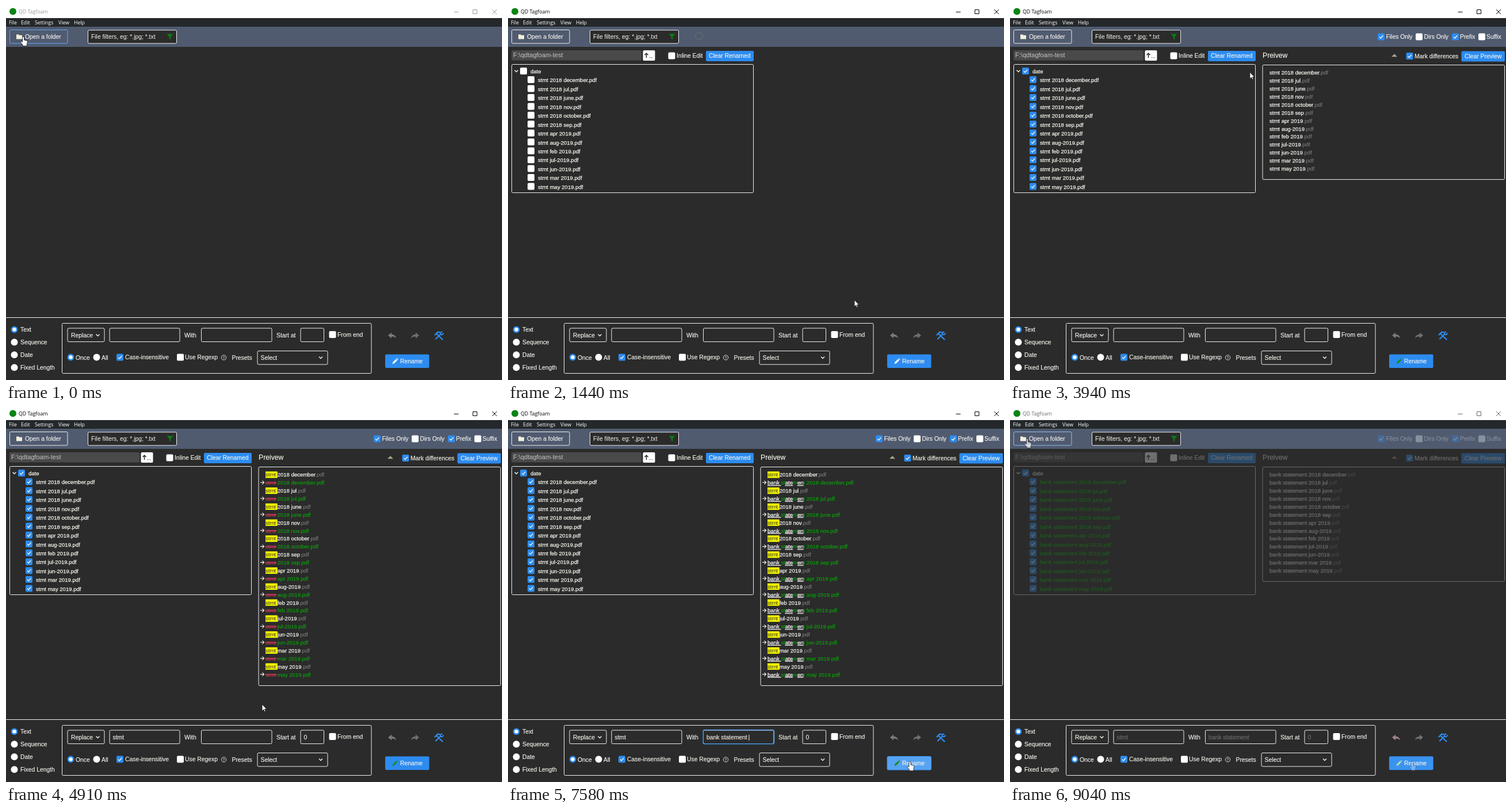
Write an HTML page that moves like this. It is 862x650 px and loops after 9240 ms.

```html
<!DOCTYPE html>
<html lang="en">
<head>
<meta charset="utf-8">
<title>QD Tagfoam</title>
<style>
html, body { margin: 0; width: 100%; height: 100%; overflow: hidden; background: #2b2b2b; }
svg { display: block; }
text { font: 10.35px "Liberation Sans", Arial, sans-serif; fill: #f6f5ee; white-space: pre; }
.ui { stroke: #f6f5ee; stroke-width: .15; }
.menu { font: 8.75px "Open Sans", "Noto Sans", sans-serif; fill: #fff; }
.title { font: 8.75px "Open Sans", "Noto Sans", sans-serif; }
.name { font-size: 9.54px; }
.strong { fill: #f6f5ee; stroke: #f6f5ee; stroke-width: .25; }
.path { font-size: 11.05px; fill: #c4c4c4; }
.head { font-size: 12.2px; }
.new { fill: #0b0; }
.done { fill: #0b0; stroke: #0b0; stroke-width: .2; }
.ext { fill: #858585; }
.cut { fill: #e0405a; text-decoration: line-through; }
.add { fill: #fff; stroke: #fff; stroke-width: .25; text-decoration: underline; }
.frame { fill: none; stroke: #eee; }
.blue { fill: #2d8cf0; }
.white { fill: #fff; }
.stroke { fill: none; stroke: #f4f4ee; stroke-width: 1.4; }
</style>
</head>
<body>
<svg width="862" height="650" viewBox="0 0 862 650">
  <g id="start"></g>
  <g id="live"></g>
</svg>
<script>
const LOOP = 9240;
const STEP = 110;
const TYPED = 'bank statement ';
const names = ['2018 december', '2018 jul', '2018 june', '2018 nov', '2018 october', '2018 sep',
  'apr 2019', 'aug-2019', 'feb 2019', 'jul-2019', 'jun-2019', 'mar 2019', 'may 2019'];

// Pointer moves: begin, end, from x, y, to x, y
const moves = [
  [440, 1320, 30, 53, 602, 511],
  [1770, 2610, 602, 511, 32, 116],
  [3170, 4050, 32, 116, 465, 115],
  [4580, 4910, 465, 115, 445, 515],
  [5020, 5250, 445, 515, 400, 572],
  [5480, 5910, 400, 572, 530, 535],
  [7360, 7580, 530, 535, 698.5, 614]
];
// Pointer shape from each time on
const shapes = [[0, 'hand'], [110, 'arrow'], [2610, 'hand'], [3270, 'arrow'], [4050, 'beam'],
  [4690, 'arrow'], [5250, 'beam'], [5590, 'arrow'], [7580, 'hand']];
const fades = [[0, 1], [8550, .8], [8640, .65], [8840, .5], [9040, .32]];
const previews = [[0, ''], [2730, 'plain'], [4470, 'cut'], [5690, 'first'], [7250, 'full'], [8010, 'done']];

const latest = (list, t) => list.filter(([from]) => from <= t).pop()[1];

function pointerAt(t) {
  const move = moves.filter(m => m[0] <= t).pop();
  if (!move) return [30, 53];
  const [begin, end, x0, y0, x1, y1] = move;
  const count = Math.round((end - begin) / STEP) + 1;
  const done = Math.floor((t - begin) / (end - begin) * (count - 1) + 1e-6) + 1;
  const k = Math.min(1, done / count);
  return [x0 + (x1 - x0) * k, y0 + (y1 - y0) * k];
}

function stateAt(t) {
  return {
    active: t >= 110,
    opening: t < 440,
    loaded: t >= 1440,
    spinner: t >= 1440 && t < 2950,
    checked: t < 2730 ? 0 : t < 2950 ? .5 : 1,
    preview: latest(previews, t),
    find: t >= 4470,
    focus: t >= 5350 && t < 7910,
    typed: TYPED.slice(0, Math.max(0, Math.floor((t - 5570) / STEP) + 1)),
    hover: t >= 7580,
    renamed: t >= 8010,
    pointer: pointerAt(t),
    shape: latest(shapes, t)
  };
}

const text = (x, y, s, cls = 'ui') => `<text x="${x}" y="${y}" class="${cls}">${s}</text>`;
const span = (cls, s) => `<tspan class="${cls}">${s}</tspan>`;
const rect = (x, y, w, h, cls, extra = '') =>
  `<rect x="${x}" y="${y}" width="${w}" height="${h}" rx="2" class="${cls}" ${extra}/>`;
const path = (d, cls, extra = '') => `<path d="${d}" class="${cls}" ${extra}/>`;
const flat = (x, y, w, h, fill) => `<rect x="${x}" y="${y}" width="${w}" height="${h}" fill="${fill}"/>`;
const chevron = (x, y) => path(`M${x - 3} ${y - 1.5}l3 3 3-3`, 'stroke');

function check(x, y, on = 0) {
  const fill = on === 1 ? '#2d8cf0' : on ? '#b5d4f6' : '#fff';
  const tick = on ? path(`M${x + 3} ${y + 6.2}l2.2 2.2 4-4.6`, 'stroke', `opacity="${on === 1 ? 1 : .35}"`) : '';
  return rect(x, y, 12, 12, '', `fill="${fill}"`) + tick;
}
const checkLabel = (x, y, gap, label, on) => check(x, y, on) + text(x + gap, y + 9.5, label);
const radio = (x, y, gap, label, on) =>
  (on ? `<circle cx="${x}" cy="${y}" r="4.6" fill="#fff" stroke="#2d8cf0" stroke-width="2.6"/>`
      : `<circle cx="${x}" cy="${y}" r="6" fill="#fff"/>`) + text(x + gap, y + 4, label);

function header(s) {
  const ink = s.active ? '#000' : '#999';
  const menus = [[5, 'File'], [26, 'Edit'], [50, 'Settings'], [91, 'View'], [118, 'Help']];
  return flat(0, 0, 862, 650, '#2b2b2b') + flat(0, 0, 862, 21, '#fff') +
    flat(0, 21, 862, 15, '#24282b') + flat(0, 36, 862, 35, '#505b70') +
    '<circle cx="12" cy="9.5" r="6" fill="#0a8416"/>' +
    `<text x="22" y="13" class="title" style="fill:${ink}">QD Tagfoam</text>` +
    `<path d="M778.5 10.5h8M811.5 6.5h7v7h-7zM845 6l8 8M853 6l-8 8" fill="none" stroke="${ink}"/>` +
    menus.map(([x, s]) => text(x, 31.5, s, 'menu')).join('') +
    rect(6.5, 41.5, 100.5, 23.5, '', `fill="none" stroke="${s.opening ? '#64a8f0' : '#eee'}"`) +
    path('M18 49.5h4l1 1.3h5v6.7h-10z', '', 'fill="#f4f0dc"') +
    text(33, 56.5, 'Open a folder') +
    rect(142.5, 42, 154, 23, 'frame', 'style="fill:#2b2b2b"') +
    text(148, 57, 'File filters, eg: *.jpg; *.txt', '') +
    path('M279.5 48.5h11l-4.2 5v5l-2.6-2v-3z', '', 'fill="#0a7d12"') +
    (s.spinner ? '<circle cx="332" cy="52.5" r="6.2" fill="none" stroke="#70716c"/>' : '');
}

function fileTree(s) {
  const rows = names.map((name, i) => {
    const y = 122 + 15.46 * i;
    return check(34, y, s.checked) + (s.renamed
      ? text(52, y + 10.3, `bank statement ${name}.pdf`, 'name done')
      : text(52, y + 10.3, `stmt ${name}.pdf`, 'name strong'));
  });
  return rect(6, 77, 226, 17.5, '', 'fill="#4a4a4a"') +
    text(9, 89.3, 'F:\\qdtagfoam-test', 'path') +
    rect(234.5, 77, 21, 18, 'white') +
    path('M240.5 90v-7.5M237.5 85.3l3-3 3 3', '', 'fill="none" stroke="#222" stroke-width="1.4"') +
    flat(246, 89, 1.3, 1.3, '#444') + flat(249.5, 89, 1.3, 1.3, '#444') +
    checkLabel(278.5, 80.5, 14.5, 'Inline Edit') +
    rect(344, 78, 83, 18, 'blue') + text(349, 90.3, 'Clear Renamed') +
    rect(6.5, 101.5, 420, 223, 'frame') + chevron(14.5, 113) +
    check(21, 107, s.checked) + text(39, 117, 'date', 'name strong') + rows.join('');
}

function previewRow(mode, name, i) {
  const row = (n, s) => text(451, 119.3 + 13.89 * n, s, 'name');
  const plain = start => span('strong', start + name) + span('ext', '.pdf');
  if (mode === 'plain') return row(i, plain('stmt '));
  if (mode === 'done') return row(i, plain('bank statement '));
  const y = 119.3 + 13.89 * 2 * i, tail = name + '.pdf';
  const change = {
    cut: span('cut', 'stmt ') + span('new', tail),
    first: span('cut', 'stmt ') + span('add', 'b') + span('new', tail),
    full: span('add', 'bank ') + span('new', 'st') + span('add', 'ate') + span('new', 'm') +
      span('add', 'en') + span('new', 't ' + tail)
  }[mode];
  return flat(451, y - 9, 20.7, 11.2, '#ff0') +
    row(2 * i, '<tspan style="fill:#222">stmt </tspan>' + plain('')) +
    path(`M442 ${y + 10.2}h6.5m-3-3l3 3-3 3`, 'stroke', 'style="stroke-width:1.1"') +
    row(2 * i + 1, change);
}

function previewPane(s) {
  const short = s.preview === 'plain' || s.preview === 'done';
  return checkLabel(639, 47.5, 14.5, 'Files Only', 1) + checkLabel(705, 47.5, 14.5, 'Dirs Only') +
    checkLabel(768, 47.5, 14, 'Prefix', 1) + checkLabel(814, 47.5, 14, 'Suffix') +
    text(439, 90, 'Preivew', 'ui head') +
    path('M663 88.3h10l-5-5z', '', `fill="${s.renamed ? '#b08a78' : '#aaa390'}"`) +
    checkLabel(688.5, 81, 14.5, 'Mark differences', 1) +
    rect(784.5, 78.5, 75.5, 18, 'blue') + text(790, 91, 'Clear Preview') +
    rect(439, 102.5, 420.5, short ? 199 : 380, 'frame') +
    names.map((name, i) => previewRow(s.preview, name, i)).join('');
}

function controls(s) {
  const modes = ['Text', 'Sequence', 'Date', 'Fixed Length'];
  const field = (x, w, value) => rect(x, 560, w, 23.5, 'frame') + text(x + 5.5, 575.7, value);
  const arrow = 'l-6 5 6 5v-3q5.500-.5 8 3-1-6.500-8-7z';
  const caret = s.focus ? '<tspan dx="-1">|</tspan>' : '';
  return flat(0, 541, 862, 1, '#eee') +
    modes.map((m, i) => radio(14.5, 562.3 + 22 * i, 10.5, m, i === 0)).join('') +
    rect(97.5, 551.5, 537.5, 87, 'frame') +
    rect(107, 560, 64, 23.5, 'frame') + text(113, 575.7, 'Replace') + chevron(159.5, 572) +
    field(180, 122, s.find ? 'stmt' : '') + text(310, 575.7, 'With') +
    (s.focus ? rect(339, 559.5, 123.5, 24.5, '', 'fill="none" stroke="#2d8cf0" stroke-width="2" opacity=".4"') : '') +
    field(339.5, 122.5, s.typed + caret) +
    (s.focus ? rect(339.5, 560, 122.5, 23.5, '', 'fill="none" stroke="#57a3f3"') : '') +
    text(470, 575.7, 'Start at') + field(512, 40.5, s.find ? '0' : '') +
    checkLabel(561.5, 565, 14.5, 'From end') +
    radio(112.500, 610.5, 8.5, 'Once', true) + radio(157.5, 610.5, 8.500, 'All') +
    checkLabel(192, 604.5, 15, 'Case-insensitive', 1) + checkLabel(297, 604.5, 14, 'Use Regexp') +
    '<circle cx="378.500" cy="611" r="4.2" fill="none" stroke="#eee" stroke-width=".9"/>' +
    '<text x="376.6" y="613.700" style="font-size:7px">?</text>' +
    text(392.5, 614.700, 'Presets') + rect(437, 599.5, 122, 23.5, 'frame') +
    text(442.5, 614.700, 'Select') + chevron(547, 611) +
    path('M670 567.5' + arrow, '', `fill="${s.renamed ? '#ee8cb8' : '#7b7b7b'}"`) +
    `<g transform="translate(1382 0) scale(-1 1)">${path('M670 567.5' + arrow, '', 'fill="#6f6f6f"')}</g>` +
    '<g fill="none" stroke="#2d8cf0" stroke-width="2.3" stroke-linecap="round">' +
    '<path d="M747 578.500l8-8M748.500 570l10 9.500M745.500 571.500l4.500-4.500h3.500"/>' +
    '<path d="M757.500 566.500q-3.500 1-2 4.500 3.500 1 4.500-2" stroke-width="2"/></g>' +
    rect(659, 605.5, 76.500, 23.5, '', s.hover ? 'fill="#57a3f3" stroke="#3d8fe6"' : 'fill="#2d8cf0"') +
    path('M671.500 622l.8-3 5.500-5.500 2.200 2.200-5.500 5.500zM678.500 612.800l1-.9 2.200 2.200-1 .9z', '',
      `fill="${s.preview ? '#1f8a24' : '#fff'}"`) +
    text(685, 620.8, 'Rename');
}

function pointer(s) {
  const outline = 'fill="#fff" stroke="#111" stroke-width=".8"';
  const shape = {
    arrow: path('M0 0V11.5L2.600 9 4.400 13 6.200 12.200 4.500 8.300H8z', '', outline),
    hand: path('M-1.500 1.500Q-1.500 0 0 0T1.500 1.500V6L6 7.200Q7.500 7.700 7.300 9.500L6.300 14V16.500H-1V14.500L-5 9.500Q-4.500 7.500-1.500 9.500z', '', outline),
    beam: path('M-2.500-6h5M0-6v12M-2.500 6h5', '', 'fill="none" stroke="#ddd"')
  }[s.shape];
  return `<g transform="translate(${s.pointer})">${shape}</g>`;
}

const scene = s => header(s) + (s.loaded ? fileTree(s) : '') + (s.preview ? previewPane(s) : '') +
  controls(s) + pointer(s);

const live = document.getElementById('live');
document.getElementById('start').innerHTML = scene(stateAt(0));
let shown = '';

function draw() {
  const t = performance.now() % LOOP;
  const markup = scene(stateAt(t));
  if (markup !== shown) live.innerHTML = shown = markup;
  live.setAttribute('opacity', latest(fades, t));
  requestAnimationFrame(draw);
}
draw();
</script>
</body>
</html>
```
